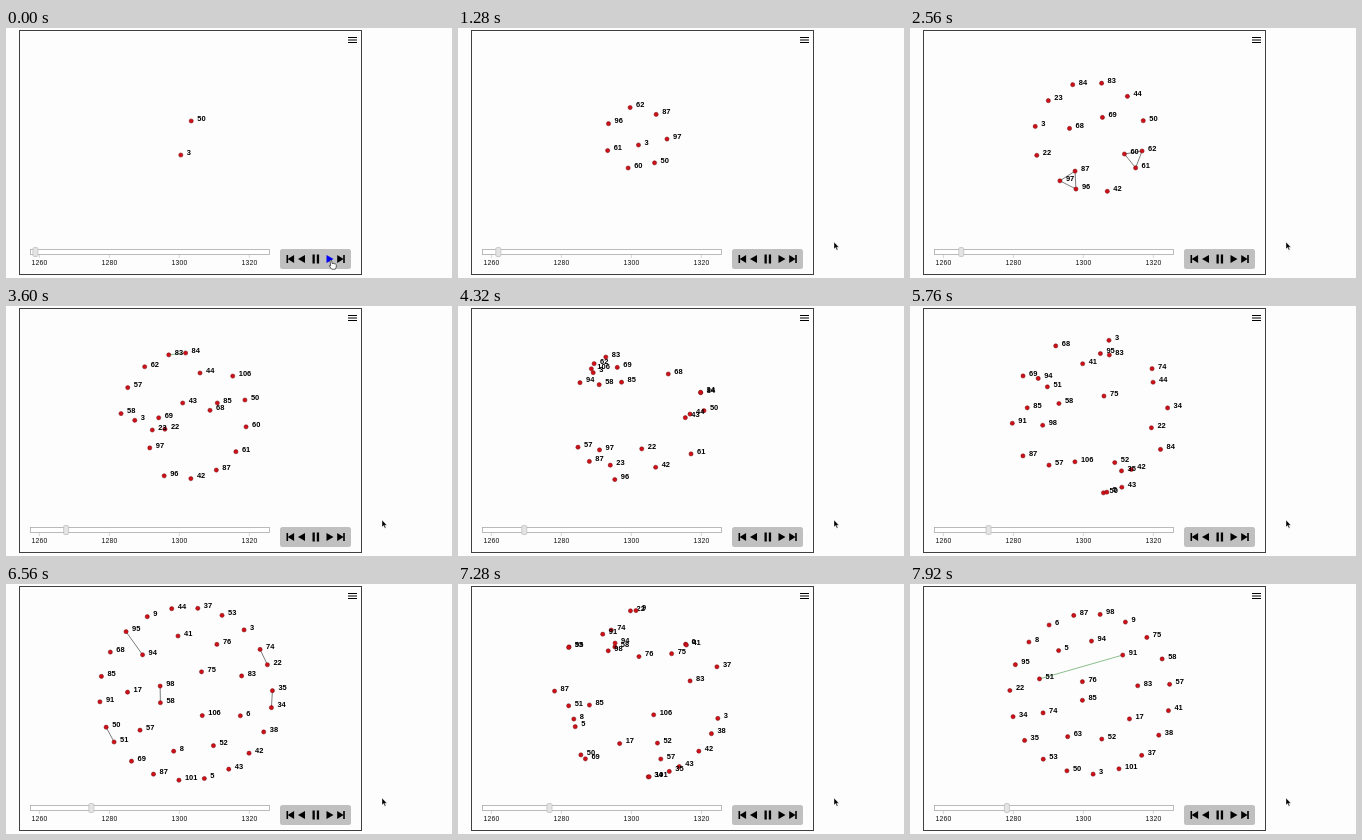
An HTML page for the animation above (8000 ms loop, 446 by 250 pixels).

```html
<!DOCTYPE html>
<html lang="en">
<head>
<meta charset="utf-8">
<title>Network timeline</title>
<style>
html, body { margin: 0; width: 100%; height: 100%; overflow: hidden; background: #fdfdfd; }
svg { display: block; width: 446px; height: 250px; }
text { font-family: "Liberation Sans", Arial, sans-serif; }
.node text { font-size: 7.5px; font-weight: bold; }
.node circle { fill: #d01018; stroke: #700c10; stroke-width: .5; }
.axis text { font-size: 6.8px; letter-spacing: .2px; text-anchor: middle; fill: #111; }
#edges line { stroke-width: .55; }
#handle { animation: slide 8s linear infinite; }
#cursor { animation: leave 8s linear infinite; }
#hand { animation: hand 8s step-end infinite; }
#arrow { animation: arrow 8s step-end infinite; }
#play { animation: hover 8s step-end infinite; }
@keyframes slide { from { transform: translateX(29.4px); } to { transform: translateX(97.6px); } }
@keyframes leave {
  0%, 3% { transform: translate(324px, 232px); animation-timing-function: ease-in-out; }
  9%, 100% { transform: translate(376px, 214px); }
}
@keyframes hand { 0% { opacity: 1; } 5.5%, 100% { opacity: 0; } }
@keyframes arrow { 0% { opacity: 0; } 5.5%, 100% { opacity: 1; } }
@keyframes hover { 0% { fill: #0000f5; } 5.5%, 100% { fill: #000; } }
</style>
</head>
<body>
<svg viewBox="0 0 446 250">
  <rect x="13.5" y="2.5" width="342" height="244" fill="#fdfdfd" stroke="#404040"/>
  <path d="M342 9.5h9M342 12h9M342 14.5h9" stroke="#000" stroke-width="1.1"/>
  <g id="edges"></g>
  <g id="nodes"></g>
  <rect x="24.5" y="221.5" width="239" height="5" fill="#fff" stroke="#aaa" stroke-width=".8"/>
  <g class="axis" id="axis"></g>
  <rect id="handle" x="-2.5" y="219.5" width="5" height="9" rx="1.5" fill="#e4e4e4" stroke="#c0c0c0" stroke-width=".8"/>
  <rect x="274" y="221" width="71" height="20" rx="2.5" fill="#c0c0c0"/>
  <path d="M280.5 227h1.6v3.7l6-3.7v8l-6-3.7v3.7h-1.6zM299 227v8l-7-4zM306.5 226.5h2.3v9h-2.3zM310.8 226.5h2.3v9h-2.3zM331.2 227l6 3.7v-3.7h1.6v8h-1.6v-3.7l-6 3.7z"/>
  <path id="play" d="M320.5 227v8l7-4z"/>
  <g id="cursor" stroke-width=".6">
    <path id="hand" d="M0 0.6q.9-1 1.6 0l.5 3 1.2-.2 1.2.4 1.1.2q.8.4.8 1.4l-.3 2-.7 1.8h-3.8l-2.4-3.4q.2-1 1.5 0z" fill="#fff" stroke="#000"/>
    <path id="arrow" d="M0 0v7l1.6-1.4 1.2 2.6 1.1-.5-1.2-2.5h2.2z" fill="#000" stroke="#fff" stroke-width=".4"/>
  </g>
</svg>
<script>
const LOOP = 8000, SLICE = 400, CX = 180, CY = 110, TIE = 17;
const GREEN = "#2f8a2f";

// A ring spreads its members clockwise from a start angle; "-" keeps a place free
const ring = (r, start, ids, x = 0, y = 0) => ({ r, start, ids: ids.split(" "), x, y });

function pose(t, rings, ties = "", color = "#111") {
  const pairs = ties ? ties.split(" ").map(p => p.split("-")) : [];
  const at = {};
  for (const g of rings) Object.assign(at, spreadRing(g, pairs));
  return { t, r: rings[0].r, at, pairs, color };
}

// Tied neighbours sit one tie length apart, the rest share what is left of the circle
function spreadRing({ r, start, ids, x, y }, pairs) {
  const after = i => ids[(i + 1) % ids.length];
  const tied = ids.map((id, i) => pairs.some(p => p.includes(id) && p.includes(after(i)) && id !== after(i)));
  const count = tied.filter(Boolean).length, free = ids.length - count;
  const tight = free ? TIE / r : 2 * Math.PI / count;
  const wide = (2 * Math.PI - tight * count) / free;
  const at = {};
  let a = start * Math.PI / 180;
  ids.forEach((id, i) => {
    if (id !== "-") at[id] = [x + r * Math.cos(a), y + r * Math.sin(a)];
    a += tied[i] ? tight : wide;
  });
  return at;
}

const poses = [
  pose(0, [ring(17.8, -73, "50 3")]),
  pose(1280, [
    ring(31, -101, "62 87 97 50 60 61 96", -2),
    ring(0, 0, "3", .5, 7)]),
  pose(2560, [
    ring(56, -108, "84 83 44 50 - - 42 - - 22 3 23"),
    ring(17.4, -18.5, "69 68", -4, -15),
    ring(10.3, -39, "62 61 60", 44, 19.7),
    ring(10.4, -63, "87 96 97", -19.7, 42.3)],
    "60-62 62-61 61-60 87-97 97-96 96-87"),
  pose(3600, [
    ring(63, -104, "83 84 - 106 50 60 61 87 42 96 - - 58 57 62", -2),
    ring(20, -90, "44 - - - 85 68 - - 43 - - -", 14, -23),
    ring(17, -51, "69 22 - 97 - - 3 -", -38, 15),
    ring(0, 0, "23", -33.7, 14)],
    "83-84", GREEN),
  pose(4960, [
    ring(69.5, -104, "3 68 69 74 34 50 84 - 43 23 57 98 106 87 94 83"),
    ring(40, -117, "58 - - 95 - - - - 35 - 85 -"),
    ring(10.5, -102, "22 44 42", 31, 35.7),
    ring(0, 0, "51", 3.7, -16.2)],
    "68-69 22-42 42-44 44-22"),
  pose(6560, [
    ring(86.5, -99.5, "44 37 53 3 74 22 35 34 38 42 43 5 101 87 69 51 50 91 85 68 95 9"),
    ring(58.5, -98, "41 76 83 6 52 8 57 17 94"),
    ring(27, -55, "75 106 58 98")],
    "95-94 74-22 98-58 35-34 50-51"),
  pose(7920, [
    ring(80.2, -101.7, "87 98 9 75 58 57 41 38 37 101 3 50 53 35 34 22 95 8 6"),
    ring(50, -86, "94 91 83 17 52 63 74 51 5", -2, -3),
    ring(9.3, -90, "76 85", -7.6, -3)],
    "51-91", GREEN)
];

function make(tag, parent, attrs = {}) {
  const el = document.createElementNS("http://www.w3.org/2000/svg", tag);
  for (const k in attrs) el.setAttribute(k, attrs[k]);
  return parent.appendChild(el);
}
const layer = id => document.getElementById(id);

for (let i = 0; i < 4; i++) {
  const x = 33.4 + 70 * i;
  make("path", layer("axis"), { d: `M${x} 227v3`, stroke: "#bbb", "stroke-width": .6 });
  make("text", layer("axis"), { x, y: 236.5 }).textContent = 1260 + 20 * i;
}

const nodes = {};
for (const id of new Set(poses.flatMap(p => Object.keys(p.at)))) {
  const g = nodes[id] = make("g", layer("nodes"), { class: "node" });
  make("circle", g, { r: 2.1 });
  make("text", g, { x: 6, y: -.2 }).textContent = id;
}

const edges = poses.flatMap(p => p.pairs.map(([a, b]) => ({
  a, b,
  slice: Math.floor(p.t / SLICE),
  el: make("line", layer("edges"), { stroke: p.color })
})));

const ease = u => u < .5 ? 4 * u ** 3 : 1 - 4 * (1 - u) ** 3;
const lerp = (a, b, u) => a + (b - a) * u;

// Every time slice eases towards the next layout
function warp(t) {
  const s = Math.floor(t / SLICE);
  return s + ease(t / SLICE - s);
}

// Turning around the centre keeps the disc filled while nodes change places
function swing(a, b, u) {
  const from = Math.atan2(a[1], a[0]);
  const turn = Math.atan2(a[0] * b[1] - a[1] * b[0], a[0] * b[0] + a[1] * b[1]);
  const r = lerp(Math.hypot(...a), Math.hypot(...b), u);
  return [r * Math.cos(from + turn * u), r * Math.sin(from + turn * u)];
}

function place(id, t, from, to) {
  let a = from.at[id], b = to.at[id];
  if (!a && !b) return null;
  if (!a || !b) {
    // Joining and leaving happen on slice boundaries, staggered by id
    const step = (Math.floor(t / SLICE) * SLICE - from.t) / (to.t - from.t);
    const turn = .15 + .7 * (id * .618 % 1);
    if ((step >= turn) === !b) return null;
    a = a || b.map(v => v * from.r / to.r);
    b = b || a.map(v => v * to.r / from.r);
  }
  return swing(a, b, (warp(t) - warp(from.t)) / (warp(to.t) - warp(from.t)));
}

function draw(t) {
  const last = poses[poses.length - 1];
  const next = poses.findIndex(p => p.t > t);
  const pos = {};
  for (const id in nodes) {
    const p = next < 0 ? last.at[id] : place(id, t, poses[next - 1], poses[next]);
    nodes[id].style.display = p ? "" : "none";
    if (!p) continue;
    pos[id] = [CX + p[0], CY + p[1]];
    nodes[id].setAttribute("transform", `translate(${pos[id]})`);
  }
  for (const { a, b, slice, el } of edges) {
    const on = pos[a] && pos[b] && Math.floor(t / SLICE) === slice;
    el.style.display = on ? "" : "none";
    if (!on) continue;
    el.setAttribute("x1", pos[a][0]);
    el.setAttribute("y1", pos[a][1]);
    el.setAttribute("x2", pos[b][0]);
    el.setAttribute("y2", pos[b][1]);
  }
}

function tick() {
  draw(performance.now() % LOOP);
  requestAnimationFrame(tick);
}
tick();
</script>
</body>
</html>
```
